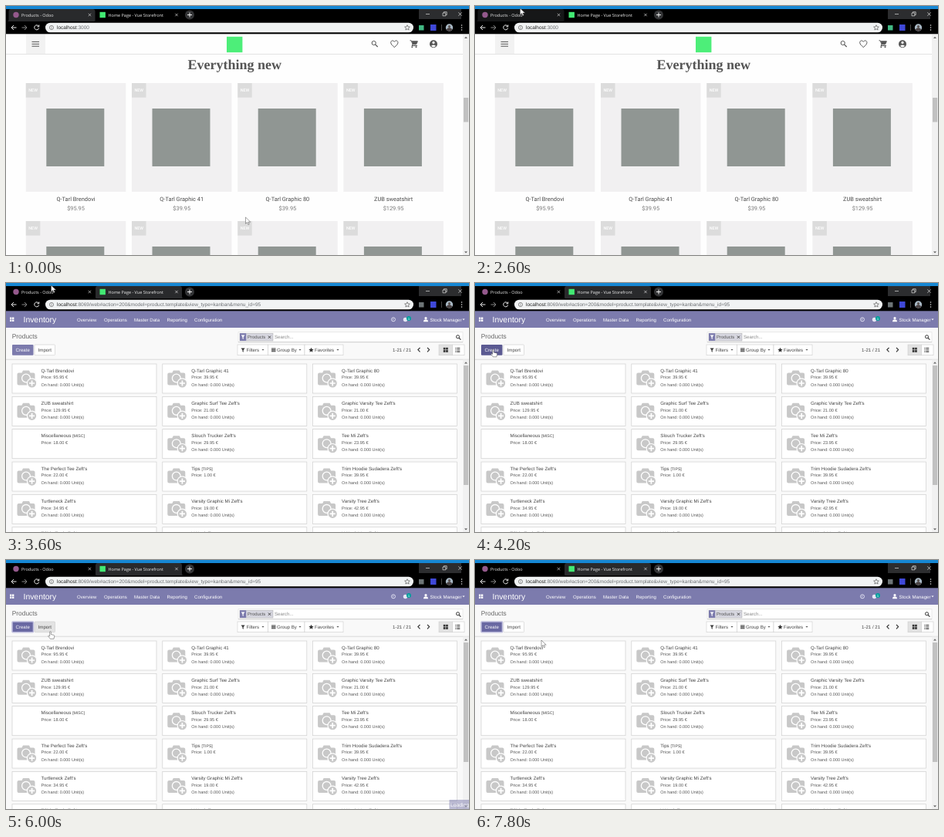
Animation of 600 by 323 pixels, one loop 8 s. Source, as an HTML page:

```html
<!DOCTYPE html>
<html lang="en">
<head>
<meta charset="utf-8">
<title>Store and inventory</title>
<style>
  html, body { margin: 0; width: 100%; height: 100%; overflow: hidden; background: #fff; }
  svg { display: block; width: 100%; height: 100%; }
  text { text-rendering: geometricPrecision; white-space: pre; }
</style>
</head>
<body>
<svg id="stage" viewBox="0 0 600 323"></svg>
<script>
const SANS = "'Liberation Sans', Arial, sans-serif";
const ROBOTO = "Roboto, sans-serif";
const UI = "'Open Sans', sans-serif";
const SERIF = "'Liberation Serif', serif";

// Drawing helpers, each returning SVG markup
const rect = (x, y, w, h, fill, extra = "") =>
  `<rect x="${x}" y="${y}" width="${w}" height="${h}" fill="${fill}" ${extra}/>`;
const circle = (x, y, r, fill, extra = "") =>
  `<circle cx="${x}" cy="${y}" r="${r}" fill="${fill}" ${extra}/>`;
const shape = (d, fill, extra = "") => `<path d="${d}" fill="${fill}" ${extra}/>`;
const line = (d, color, width = 1, extra = "") =>
  shape(d, "none", `stroke="${color}" stroke-width="${width}" ${extra}`);
const text = (x, y, str, size, fill, font = SANS, extra = "") =>
  `<text x="${x}" y="${y}" font-size="${size}" fill="${fill}" font-family="${font}" ${extra}>${str}</text>`;
const group = (x, y, body) => `<g transform="translate(${x} ${y})">${body}</g>`;
const layer = (id, body) => `<g id="${id}">${body}</g>`;
const border = (color, width = 0.6) => `stroke="${color}" stroke-width="${width}"`;
const MIDDLE = 'text-anchor="middle"';
const caret = (x, y, color, s = 2) => shape(`M${x - s} ${y}h${2 * s}l${-s} ${s}z`, color);
const cross = (x, y, s, color, width) =>
  line(`M${x - s} ${y - s}l${2 * s} ${2 * s}m0 ${-2 * s}l${-2 * s} ${2 * s}`, color, width);
const magnifier = (x, y, s, color, width) =>
  circle(x - s * .25, y - s * .25, s * .65, "none", border(color, width)) +
  line(`M${x + s * .2} ${y + s * .2}L${x + s} ${y + s}`, color, width * 1.2);
const grid = (x, y, cell, step, color) =>
  [0, 1, 2, 3].map(i => rect(x + (i % 2) * step, y + (i >> 1) * step, cell, cell, color)).join("");

// Browser window
const TAB = { active: "#000", idle: "#292a2c", hover: "#161718" };

function browserTab(x, title, icon, active) {
  const body = `M${x - 2} 20q2 0 2-2V7q0-3 3-3h106q3 0 3 3v11q0 2 2 2z`;
  return shape(body, active ? TAB.active : TAB.idle, 'class="tab"') +
    icon + text(x + 16.5, 13.5, title, 5.5, "#eee", UI) + cross(x + 105, 11.5, 1.7, "#ddd", .7);
}

function browser(onStore) {
  const odooIcon = circle(13, 11.5, 3.7, "#94598c");
  const storeIcon = rect(121.5, 7.8, 7.4, 7.4, "#42e973");
  const first = browserTab(3.5, "Products - Odoo", odooIcon, !onStore);
  const second = browserTab(116, "Home Page - Vue Storefront", storeIcon, onStore);
  const path = onStore ? ":3000"
    : ":8069/web#action=200&amp;model=product.template&amp;view_type=kanban&amp;menu_id=95";
  return rect(0, 0, 600, 36.3, "#000") + rect(0, 0, 600, 4, "#1687d3") +
    (onStore ? first + second : second + first) +
    circle(238, 11.5, 6, "#333436") + line("M235 11.5h6m-3-3v6", "#fff", .9) +
    rect(535, 4, 55, 13, "#2c2d2f") +
    line("M544 10.5h5M566 9h3.8v3.8h-3.8zm1.4 0v-1.3h3.8v3.8h-1.4", "#ddd", .7) +
    cross(588.5, 10.5, 2.1, "#ddd", .8) +
    line("M13.5 28h-6.5m3-3l-3 3l3 3", "#eee", 1) +
    line("M20.5 28h6.5m-3-3l3 3l-3 3", "#888", 1) +
    line("M42.3 26.2a3 3 0 1 0 .4 2.4M42.8 24.5v2.3h-2.3", "#eee", 1) +
    rect(51, 21.7, 477, 12.6, "#f1f3f4", 'rx="6.3"') +
    circle(59, 28, 2.6, "none", border("#666", .7)) + line("M59 27.5v2m0-3.2v.6", "#666", .7) +
    text(66, 30.3, `localhost<tspan fill="#6c6f73">${path}</tspan>`, 6.5, "#222") +
    line("M520 24.7l1 2.2l2.4.2l-1.8 1.6l.5 2.3l-2.1-1.2l-2.1 1.2l.5-2.3l-1.8-1.6l2.4-.2z", "#555", .7) +
    rect(535, 25, 6.5, 6.5, onStore ? "#42b883" : "#6d7476") +
    rect(550, 24, 7.5, 8, "#3f48d8") + rect(564, 24, .6, 8, "#777") +
    circle(574.5, 28, 4.7, "#a9b9c6") + shape("M570.5 30.5q4-5 8 0q-4 4.5-8 0z", "#4b4344") +
    circle(574.5, 26.5, 1.6, "#59504e") +
    [25, 28, 31].map(y => circle(590.5, y, .8, "#ddd")).join("");
}

function scrollbar(top, thumbTop, thumbHeight) {
  return rect(592, top, 8, 323 - top, "#f1f1f1") + rect(593, thumbTop, 6.2, thumbHeight, "#c1c1c1") +
    shape(`M594 ${top + 5}h4l-2-2.3z`, "#666") + caret(596, 318.5, "#555");
}

// Storefront
const storeItems = [
  ["Q-Tarl Brendovi", "$95.95"], ["Q-Tarl Graphic 41", "$39.95"],
  ["Q-Tarl Graphic 80", "$39.95"], ["ZUB sweatshirt", "$129.95"]
];

function storeCard([name, price], x, y) {
  return group(x, y, rect(0, 0, 129.5, 141, "#f1f0f1") + rect(26.5, 33, 75, 75, "#909693") +
    rect(0, 0, 18.5, 18.7, "#dcdcdc") + text(9.3, 11.4, "NEW", 5.4, "#fff", ROBOTO, MIDDLE + ' font-weight="500"') +
    text(64.7, 153.2, name, 7.4, "#4a4a4a", ROBOTO, MIDDLE) +
    text(64.7, 165, price, 7.4, "#7a7a7a", ROBOTO, MIDDLE));
}

function storePage() {
  const ink = "#555";
  const cards = [100, 279].map(y => storeItems.map((item, i) => storeCard(item, 25.8 + i * 137.2, y)).join("")).join("");
  return rect(0, 36, 600, 287, "#fefefe") + cards +
    text(296.3, 81.5, "Everything new", 18, ink, SERIF, MIDDLE + ' font-weight="bold"') +
    rect(0, 62, 592, .7, "#d8d8d8") + rect(26, 36.3, 25, 25.7, "#f2f2f2") +
    line("M33.5 46.4h9.5m-9.5 2.9h9.5m-9.5 2.9h9.5", ink, 1) +
    rect(286, 39.8, 20.4, 20.4, "#4dee79") +
    magnifier(477.7, 49, 4, ink, 1) +
    line("M503.3 53.6C500.5 51 498.7 49.5 498.7 47.4C498.7 44.6 502 44.1 503.3 46.4C504.6 44.1 507.9 44.6 507.9 47.4C507.9 49.5 506.1 51 503.3 53.6z", ink, 1) +
    line("M523.5 44.8h1.6l2 5h4.5l1.8-4h-7.3M527 49.5l-1 2h7", ink, 1) +
    shape("M525.8 45.7h7.5l-2 4h-4z", ink) +
    circle(526.3, 53.3, 1, ink) + circle(531.5, 53.3, 1, ink) +
    circle(554, 49.3, 5, ink) + circle(554, 47.4, 1.6, "#fff") + shape("M551 51.8q3-2.6 6 0q-3 3.2-6 0z", "#fff") +
    scrollbar(37, 119, 31.5);
}

// Inventory
const inventory = [
  ["Q-Tarl Brendovi", "95.95"], ["Q-Tarl Graphic 41", "39.95"], ["Q-Tarl Graphic 80", "39.95"],
  ["ZUB sweatshirt", "129.95"], ["Graphic Surf Tee Zeft's", "21.00"], ["Graphic Varsity Tee Zeft's", "21.00"],
  ["Miscellaneous", "18.00", "MISC"], ["Slouch Trucker Zeft's", "29.95"], ["Tee Mi Zeft's", "23.95"],
  ["The Perfect Tee Zeft's", "22.00"], ["Tips", "1.00", "TIPS"], ["Trim Hoodie Sudadera Zeft's", "39.95"],
  ["Turtleneck Zeft's", "34.95"], ["Varsity Graphic Mi Zeft's", "19.00"], ["Varsity Tree Zeft's", "42.95"],
  ["TShirt Tunic Zeft's", "21.00"], ["V-Neck Tee", "25.00"], ["V-Neck Vest Zeft's", "25.00"]
];

const camera = shape("M6.5 13.5q0-2 2-2h4l1.5-3h8l1.5 3h4q2 0 2 2v12q0 2-2 2h-19q-2 0-2-2z", "#c8c8c8") +
  circle(18, 18.5, 5.4, "none", border("#fff", 1.3)) +
  circle(25.6, 25, 6.2, "#c8c8c8", border("#fff", 1.2)) + line("M22 25h7.2m-3.6-3.6v7.2", "#fff", 1.7);

function productCard([name, price, code], i) {
  const tag = code ? ` <tspan font-size="5.2">[${code}]</tspan>` : "";
  const image = code === "MISC" ? "" : camera;
  const stock = code ? "" : text(37.5, 28.7, "On hand: 0.000 Unit(s)", 5.5, "#555");
  return group(8 + (i % 3) * 194.8, 105 + Math.floor(i / 3) * 42.35,
    rect(0, 0, 187, 38, "#fff", border("#cfcfcf", .7)) + image +
    text(37.5, 10.6, name + tag, 6.15, "#444") + text(37.5, 19.2, `Price: ${price} €`, 5.6, "#555") + stock);
}

function inventoryPage() {
  const menu = [[92, "Overview"], [127, "Operations"], [166, "Master Data"], [208.5, "Reporting"], [244, "Configuration"]];
  const ink = "#444", button = border("#ccc");
  return rect(0, 36, 600, 287, "#f9f9f9") + inventory.map(productCard).join("") +
    rect(0, 36, 600, 22, "#7c7bad") + grid(5, 44.5, 2.4, 3, "#fff") +
    text(22.5, 51, "Inventory", 10.4, "#fff") +
    menu.map(([x, label]) => text(x, 49.6, label, 6.1, "#fff")).join("") +
    circle(502, 47.3, 2.5, "none", border("#e6e6f4", .9)) + line("M502 45.8v1.7h-1.2", "#e6e6f4", .6) +
    circle(517.5, 47.5, 2.7, "#e6e6f4") + circle(522, 46, 3, "#00a09d") + text(522, 47.7, "1", 4.5, "#fff", SANS, MIDDLE) +
    circle(544, 45.5, 1.6, "#fff") + shape("M541 50.3q0-3 3-3t3 3z", "#fff") +
    text(549.5, 49.6, "Stock Manager", 6.1, "#fff") + caret(593, 46.6, "#fff", 1.6) +
    text(7.7, 72.3, "Products", 8.4, "#666") +
    rect(301, 63.8, 291, 13, "#fff", border("#ddd", .6)) + rect(301, 76.5, 291, .6, "#bbb") +
    rect(303, 65.2, 43, 9.8, "#d6d6df", border("#aaa", .5)) + rect(303, 65.2, 8.2, 9.8, "#7c7bad") +
    shape("M304.7 67.6h4.8l-1.8 2.4v3l-1.2-.8v-2.2z", "#fff") +
    text(313, 72.2, "Products", 5.9, "#555") + cross(341.5, 70.2, 1.6, "#444", 1) +
    text(348, 72.4, "Search...", 6.1, "#888") + magnifier(586.3, 70.5, 3.1, "#333", 1) +
    [[300, 39.5], [339.5, 47.5], [387, 50]].map(([x, w]) => rect(x, 80, w, 13.7, "#fff", button)).join("") +
    shape("M304.6 84.5h5l-1.9 2.5v2.8l-1.2-.8v-2z", "#333") + text(311.5, 89, "Filters", 6.1, ink) + caret(333, 86, ink, 1.6) +
    line("M344 85h5.5m-5.5 1.9h5.5m-5.5 1.9h5.5", "#333", 1.1) + text(351, 89, "Group By", 6.1, ink) + caret(381, 86, ink, 1.6) +
    shape("M395.5 83.7l.9 2.1l2.3.2l-1.7 1.5l.5 2.2l-2-1.2l-2 1.2l.5-2.2l-1.7-1.5l2.3-.2z", "#333") +
    text(400, 89, "Favorites", 6.1, ink) + caret(430, 86, ink, 1.6) +
    text(501, 89, "1-21 / 21", 6.1, ink) +
    line("M536.5 83.8l-2.6 2.8l2.6 2.8m9.5-5.6l2.6 2.8l-2.6 2.8", "#333", 1.2) +
    rect(561, 80, 17.5, 13.7, "#e2e2e2", button) + rect(578.5, 80, 15.5, 13.7, "#fff", button) +
    grid(566.8, 83.8, 2.7, 3.3, "#333") + line("M582.3 84.5h1.2m.8 0h4m-6 2.3h1.2m.8 0h4m-6 2.3h1.2m.8 0h4", "#333", 1.1) +
    rect(0, 98.8, 600, .7, "#ccc") + scrollbar(99.5, 107, 155) +
    layer("create", rect(8, 80, 27.5, 13.7, "#7c7bad", 'rx="1"') + text(21.7, 89, "Create", 6.1, "#fff", SANS, MIDDLE)) +
    layer("import", rect(37, 80, 26.5, 13.7, "#fff", 'rx="1" ' + button) + text(50.3, 89, "Import", 6.1, ink, SANS, MIDDLE)) +
    layer("loading", rect(574.5, 311, 25.5, 12, "#7c7bad") + text(576, 319.6, "Loading", 6.8, "#fff"));
}

// Pointer
const outline = 'stroke="#444" stroke-width=".5" stroke-linejoin="round"';
const arrow = shape("M0 0v8.4l2-1.8l1.4 3l1.4-.6l-1.4-2.9h2.8z", "#fff", outline);
const hand = shape("M-.8 0q.8-.8 1.6 0v3.5l3.6.9q1 .4.9 1.4l-.8 3.5h-4.6l-2.8-3.6q.6-1.2 2.1.2z", "#fff", outline);

const stage = document.getElementById("stage");
stage.innerHTML =
  layer("store", storePage() + browser(true)) +
  layer("inventory", inventoryPage() + browser(false)) +
  layer("pointer", layer("arrow", arrow) + layer("hand", hand));

const find = selector => stage.querySelector(selector);
const parts = Object.fromEntries([...stage.querySelectorAll("g[id]")].map(g => [g.id, g]));
const createBox = find("#create rect"), importBox = find("#import rect"), productsTab = find("#store .tab");
const show = (node, visible) => node.setAttribute("display", visible ? "inline" : "none");
const clamp = v => Math.min(1, Math.max(0, v));
const ease = v => v * v * (3 - 2 * v);

const LOOP = 8000, STEP = 200, SWITCH = 2800, CLICK = 4800;
const route = [ // time, x, y
  [0, 310.5, 274], [1400, 310.5, 274], [2400, 58.5, 3], [3600, 58.5, 3], [4200, 23.5, 86.5],
  [5200, 23.5, 86.5], [6000, 57.5, 93], [6200, 57.5, 93], [7200, 86, 104], [LOOP, 86, 104]
];

function pointerAt(time) {
  const next = route.findIndex(([t]) => t > time);
  const [t0, x0, y0] = route[next - 1], [t1, x1, y1] = route[next];
  const k = ease((time - t0) / (t1 - t0));
  return [x0 + (x1 - x0) * k, y0 + (y1 - y0) * k];
}

function draw(now) {
  const time = Math.floor(now % LOOP / STEP) * STEP;
  const [x, y] = pointerAt(time);
  const onInventory = time >= SWITCH;
  const onRow = onInventory && y > 80 && y < 94;
  const overCreate = onRow && x > 8 && x < 35.5;
  const overImport = onRow && x > 37 && x < 63.5;
  const focused = time >= CLICK;

  show(parts.store, !onInventory);
  show(parts.inventory, onInventory);
  show(parts.hand, overCreate || overImport);
  show(parts.arrow, !(overCreate || overImport));
  parts.pointer.setAttribute("transform", `translate(${x} ${y})`);

  productsTab.setAttribute("fill", y < 20 && x < 115 ? TAB.hover : TAB.idle);
  createBox.setAttribute("fill", overCreate ? "#5b5a92" : focused ? "#6968a2" : "#7c7bad");
  createBox.setAttribute("stroke", focused ? "#bdbcdc" : "none");
  createBox.setAttribute("stroke-width", 1.6);
  importBox.setAttribute("fill", overImport ? "#e3e3e3" : "#fff");
  parts.loading.setAttribute("opacity", Math.min(clamp((time - 4900) / 400), clamp((6300 - time) / 600)));
  requestAnimationFrame(() => draw(performance.now()));
}
draw(0);
</script>
</body>
</html>
```
